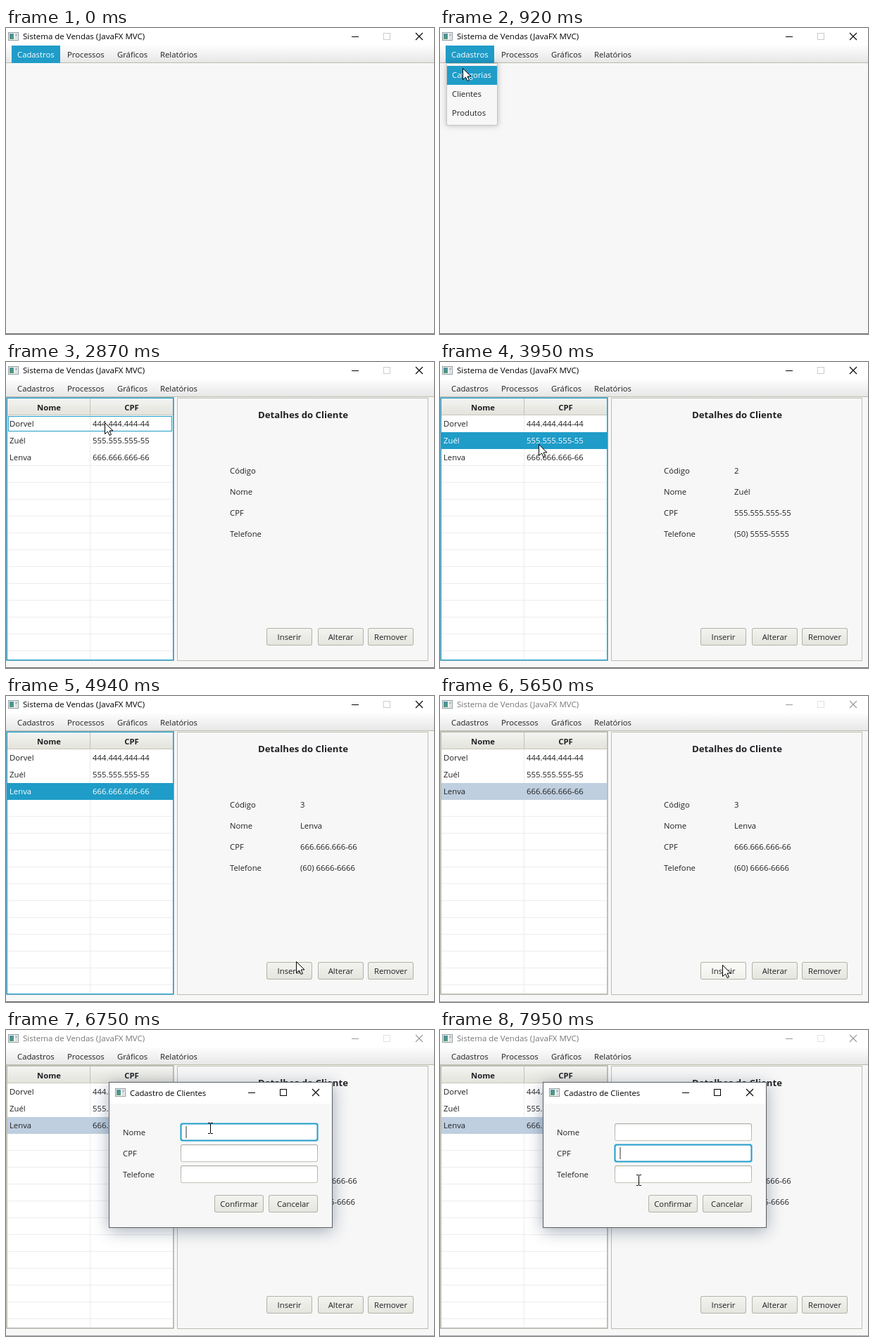
These frames come from a looping animation (608 by 436 pixels, 8 s). An HTML page with a canvas:

```html
<!DOCTYPE html>
<html lang="pt-BR">
<head>
<meta charset="utf-8">
<title>Sistema de Vendas</title>
<style>
  html, body { margin: 0; width: 100%; height: 100%; overflow: hidden; background: #f7f7f7; }
  canvas { display: block; width: 608px; height: 436px; }
</style>
</head>
<body>
<canvas id="stage" width="608" height="436"></canvas>
<script>
const ctx = document.getElementById('stage').getContext('2d');
const LOOP = 8000, STEP = 60;
const BLUE = '#1f9cc8', INK = '#202024', PANEL = '#f7f7f7', EDGE = '#bdbdb4';

const clients = [
  { name: 'Dorvel', cpf: '444.444.444-44', phone: '(40) 4444-4444' },
  { name: 'Zuél', cpf: '555.555.555-55', phone: '(50) 5555-5555' },
  { name: 'Lenva', cpf: '666.666.666-66', phone: '(60) 6666-6666' }
];
const menus = [['Cadastros', 16], ['Processos', 87], ['Gráficos', 158], ['Relatórios', 219]];
const menuItems = ['Categorias', 'Clientes', 'Produtos'];

const at = {
  menuOpen: 330, menuClose: 1560, view: 1760, picks: [2930, 3620, 4380],
  press: 5450, deactivate: 5650, dialog: 5710,
  focusName: 6550, caretName: 6750, caretNameOff: 7210, focusCpf: 7570, caretCpf: 7630
};

// time, x, y of the pointer
const path = [
  [330, 33, 41], [800, 33, 41], [1160, 33, 91], [1700, 33, 91],
  [2190, 140, 248], [2330, 140, 248], [2870, 141, 87], [3200, 141, 87],
  [3620, 141, 114], [3890, 141, 114], [3950, 141, 118], [4380, 140, 131],
  [4580, 140, 131], [4940, 413, 379], [5120, 404, 392], [5590, 404, 392],
  [5890, 395, 354], [6430, 290, 143], [6490, 290, 140], [7150, 290, 140],
  [7630, 290, 180], [7770, 290, 180], [7950, 282, 214], [LOOP, 282, 214]
];

function pointerAt(t) {
  const i = path.findIndex(key => key[0] > t);
  if (i < 1) return { x: -99, y: -99 };
  const [t0, x0, y0] = path[i - 1], [t1, x1, y1] = path[i];
  const k = Math.floor((t - t0) / STEP) * STEP / (t1 - t0);
  return { x: Math.round(x0 + (x1 - x0) * k), y: Math.round(y0 + (y1 - y0) * k) };
}

const inside = (p, x, y, w, h) => p.x > x && p.x < x + w && p.y > y && p.y < y + h;

function rect(x, y, w, h, fill) {
  ctx.fillStyle = fill;
  ctx.fillRect(x, y, w, h);
}

function frame(x, y, w, h, color) {
  ctx.strokeStyle = color;
  ctx.lineWidth = 1;
  ctx.strokeRect(x + .5, y + .5, w - 1, h - 1);
}

function vertical(y, h, ...colors) {
  const g = ctx.createLinearGradient(0, y, 0, y + h);
  colors.forEach((c, i) => g.addColorStop(i / (colors.length - 1), c));
  return g;
}

function text(str, x, y, { color = INK, size = 11.3, bold = false, align = 'left' } = {}) {
  ctx.font = `${bold ? 'bold ' : ''}${size}px "Open Sans", "Noto Sans", sans-serif`;
  ctx.fillStyle = color;
  ctx.textAlign = align;
  ctx.fillText(str, x, y);
}

function rounded(x, y, w, h, r, fill) {
  ctx.beginPath();
  ctx.roundRect(x, y, w, h, r);
  ctx.fillStyle = fill;
  ctx.fill();
}

function button(label, x, y, w, h, p, { focus = false, pressed = false } = {}) {
  const hover = inside(p, x, y, w, h);
  if (focus) {
    rounded(x - 1, y - 1, w + 2, h + 2, 4, '#a9d8eb');
    rounded(x, y, w, h, 3, BLUE);
  } else {
    rounded(x, y, w, h, 3, '#b3b3aa');
  }
  const inset = focus ? 1.5 : 1;
  const face = pressed ? ['#d8d8cf', '#e2e2da'] : hover ? ['#fbfbf9', '#f0f0ea'] : ['#f3f3f0', '#e5e5de'];
  rounded(x + inset, y + inset, w - 2 * inset, h - 2 * inset, 2, vertical(y, h, ...face));
  text(label, x + w / 2, y + 17, { align: 'center' });
}

function field(y, focus, caret) {
  if (focus) {
    rounded(247, y - 1, 197, 27, 4, '#8ccbe4');
    rounded(248, y, 195, 25, 3, BLUE);
    rounded(249.5, y + 1.5, 192, 22, 2, '#fff');
  } else {
    rounded(248, y, 195, 25, 3, vertical(y, 25, '#a9a9a3', '#c4c4bd'));
    rounded(249, y + 1, 193, 23, 2, vertical(y, 23, '#f3f3f3', '#fff', '#fff', '#fff', '#fff'));
  }
  if (caret) rect(255.5, y + 4, 1, 17, '#333');
}

function appIcon(x, y) {
  rect(x, y, 15, 12, '#8d9a9d');
  rect(x + 1, y + 1, 13, 10, '#f4f6f6');
  rect(x + 2, y + 2, 6, 8, vertical(y + 2, 8, '#4f8fa0', '#4d9a78'));
  rect(x + 10, y + 2, 3, 4, '#b9c4c6');
  rect(x + 10, y + 7, 3, 3, '#d4dadb');
}

function windowButtons(x, y, color, maxColor) {
  rect(x, y, 10, 1, color);
  frame(x + 45, y - 5, 10, 10, maxColor);
  ctx.strokeStyle = color;
  ctx.lineWidth = 1.1;
  ctx.beginPath();
  ctx.moveTo(x + 91, y - 5); ctx.lineTo(x + 101, y + 5);
  ctx.moveTo(x + 101, y - 5); ctx.lineTo(x + 91, y + 5);
  ctx.stroke();
}

function drawWindow(t) {
  const active = t < at.deactivate;
  rect(0, 0, 608, 436, PANEL);
  rect(0, 0, 608, 25, '#fff');
  appIcon(3, 6);
  text('Sistema de Vendas (JavaFX MVC)', 24, 16, { size: 11.5, color: active ? '#000' : '#777' });
  windowButtons(491, 12, active ? '#000' : '#999', active ? '#ccc' : '#e2e2e2');
  rect(0, 25, 608, 24, vertical(25, 24, '#fdfdfd', '#f2f2f2', '#e7e7e7'));
  rect(0, 49, 608, 1, '#b9b9a9');
  const open = t < at.view;
  if (open) rect(8, 25, 69, 25, BLUE);
  menus.forEach(([label, x], i) => text(label, x, 42, { color: open && !i ? '#fff' : INK }));
  rect(0, 435, 608, 1, active ? '#6a6a6a' : '#aaa');
}

function drawMenu(p) {
  ctx.save();
  ctx.shadowColor = 'rgba(0,0,0,.25)';
  ctx.shadowBlur = 8;
  rect(9, 50, 73, 89, '#f7f7f7');
  ctx.restore();
  frame(9, 50, 73, 89, '#c6c6c0');
  menuItems.forEach((label, i) => {
    const y = 54 + i * 27, hover = inside(p, 9, y - 1, 73, 28);
    if (hover) rect(10, y, 71, 27, BLUE);
    text(label, 17, y + 17, { color: hover ? '#fff' : INK });
  });
}

function drawTable(t, selected) {
  const focused = t < at.press;
  rect(0, 50, 239, 376, focused ? '#86b4c6' : '#c4c4bc');
  rect(1, 51, 237, 374, focused ? BLUE : '#b9b9b1');
  rect(2, 52, 235, 372, '#fff');
  rect(2, 52, 235, 24, vertical(52, 24, '#f4f4f2', '#ebebe6', '#e3e3db'));
  rect(2, 75, 235, 1, '#c6c6bd');
  rect(119, 52, 1, 24, '#c2c2b9');
  text('Nome', 61, 69, { bold: true, align: 'center' });
  text('CPF', 178.5, 69, { bold: true, align: 'center' });
  for (let y = 147; y < 424; y += 24) rect(2, y, 235, 1, '#ededed');
  rect(119, 76, 1, 348, '#ededed');
  clients.forEach((client, i) => {
    const y = 76 + i * 24, on = i === selected;
    if (on) rect(2, y, 235, 24, focused ? BLUE : '#bfcfdf');
    const color = on && focused ? '#fff' : INK;
    text(client.name, 5, y + 16, { color });
    text(client.cpf, 123, y + 16, { color });
  });
  if (selected < 0) frame(3, 77, 233, 22, BLUE);
}

function drawDetails(t, selected, p) {
  frame(243, 51, 357, 375, EDGE);
  text('Detalhes do Cliente', 422, 80, { bold: true, size: 13.2, align: 'center' });
  const client = clients[selected];
  const values = client ? [selected + 1, client.name, client.cpf, client.phone] : [];
  ['Código', 'Nome', 'CPF', 'Telefone'].forEach((label, i) => {
    text(label, 318, 159 + i * 30);
    if (client) text(String(values[i]), 418, 159 + i * 30);
  });
  button('Inserir', 370, 379, 65, 25, p, { pressed: t >= at.press && t < at.deactivate });
  button('Alterar', 443, 379, 65, 25, p);
  button('Remover', 514, 379, 65, 25, p);
}

function drawDialog(t, p) {
  ctx.save();
  ctx.shadowColor = 'rgba(40,60,85,.42)';
  ctx.shadowBlur = 22;
  ctx.shadowOffsetY = 4;
  rect(146, 74, 318, 208, '#5b5f63');
  ctx.restore();
  rect(147, 75, 316, 30, '#fff');
  rect(147, 105, 316, 176, PANEL);
  appIcon(155, 83);
  text('Cadastro de Clientes', 176, 94, { color: '#000' });
  windowButtons(344, 89, '#000', '#000');
  ['Nome', 'CPF', 'Telefone'].forEach((label, i) => text(label, 166, 150 + i * 30));
  const onCpf = t >= at.focusCpf, onName = t >= at.focusName && !onCpf;
  field(133, onName, t >= at.caretName && t < at.caretNameOff);
  field(163, onCpf, t >= at.caretCpf);
  field(193, false, false);
  const shift = t >= at.focusName ? 1 : 0;
  button('Confirmar', 295 + shift, 234 + shift, 70, 26 - shift, p, { focus: !shift });
  button('Cancelar', 372 + shift, 234 + shift, 70, 25, p);
}

function drawArrow({ x, y }) {
  const outline = [[0, 0], [0, 16], [4, 12.5], [6.5, 18], [9, 17], [6.5, 11.5], [11.5, 11.5]];
  ctx.beginPath();
  outline.forEach(([dx, dy]) => ctx.lineTo(x + dx - .5, y + dy - .5));
  ctx.closePath();
  ctx.fillStyle = '#fff';
  ctx.fill();
  ctx.strokeStyle = '#000';
  ctx.lineWidth = 1;
  ctx.stroke();
}

function drawBeam({ x, y }) {
  rect(x, y - 7, 1, 14, '#000');
  for (const dy of [-8, 7]) {
    rect(x - 3, y + dy, 3, 1, '#000');
    rect(x + 1, y + dy, 3, 1, '#000');
  }
}

function draw(t) {
  const p = pointerAt(t), dialog = t >= at.dialog;
  const selected = at.picks.filter(pick => t >= pick).length - 1;
  drawWindow(t);
  if (t >= at.view) {
    drawTable(t, selected);
    drawDetails(t, selected, dialog ? { x: -99, y: -99 } : p);
  }
  if (t >= at.menuOpen && t < at.menuClose) drawMenu(p);
  if (dialog) drawDialog(t, p);
  const overField = dialog && [133, 163, 193].some(y => inside(p, 248, y, 195, 25));
  (overField ? drawBeam : drawArrow)(p);
}

const start = performance.now();
function tick() {
  draw((performance.now() - start) % LOOP);
  requestAnimationFrame(tick);
}
tick();
</script>
</body>
</html>
```
